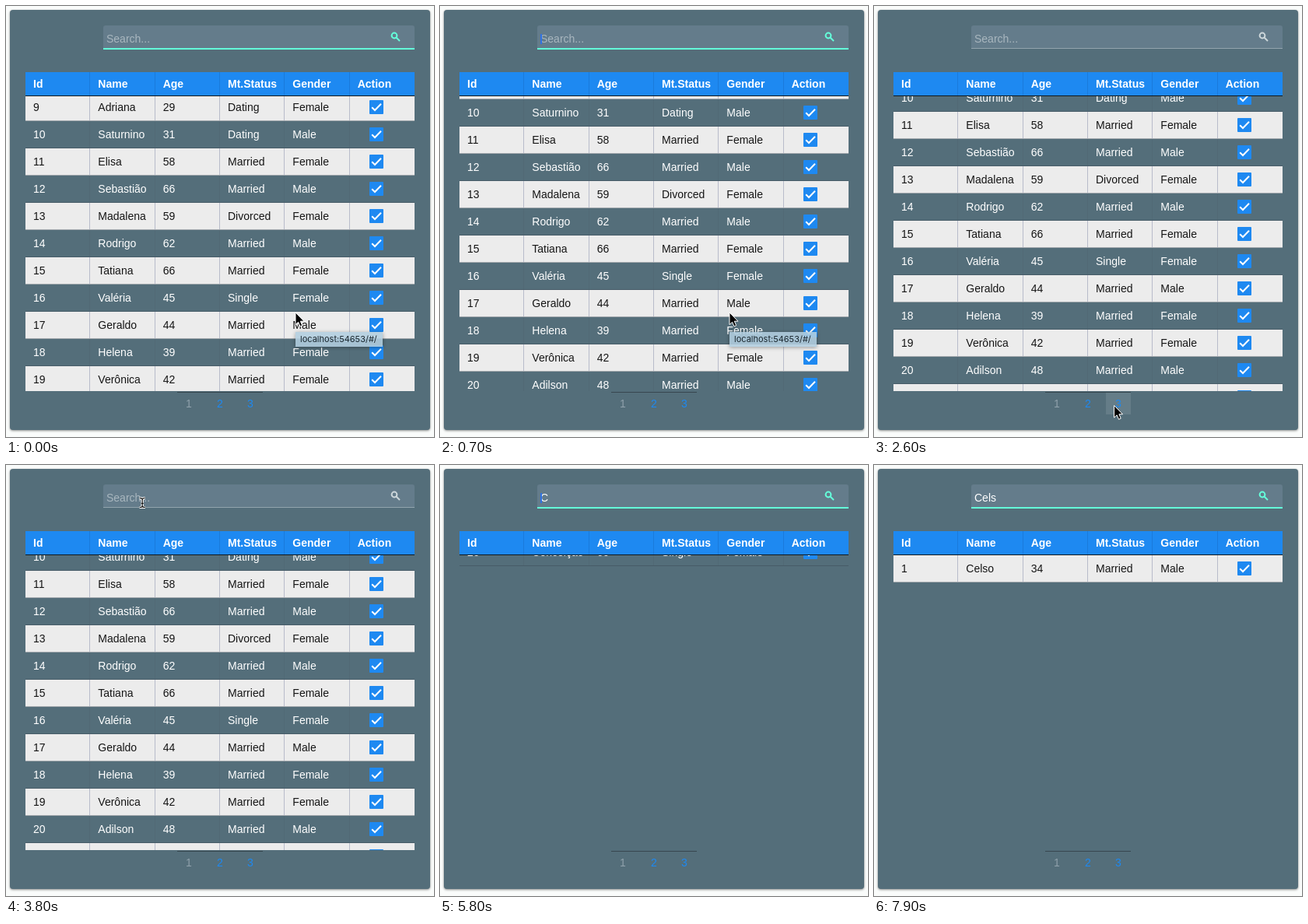
An HTML page that plays this animation: 550x554 px, repeating every 8 s.

```html
<!DOCTYPE html>
<html lang="en">
<head>
<meta charset="utf-8">
<title>Searchable table</title>
<style>
  html, body { margin: 0; width: 100%; height: 100%; overflow: hidden; background: #fafcfb; }
  body { position: relative; font: 14px "Liberation Sans", Arial, sans-serif; color: #fff; }
  div, svg { position: absolute; box-sizing: border-box; }
  #card { left: 5px; top: 5px; width: 540px; height: 540px; border-radius: 4px;
    background: #546e7a; box-shadow: 0 1px 3px rgba(0,0,0,.45); }
  #field { left: 125px; top: 25px; width: 400px; height: 30px; border-radius: 3px 3px 0 0;
    background: #647c8b; border-bottom: 1px solid #93a4ad; line-height: 34px; padding-left: 4px; }
  #line { left: 0; top: 29px; width: 400px; height: 2px; background: #64ffda; opacity: var(--focus); }
  #hint { left: 4px; top: 0; color: #a9b7bf; }
  #caret { width: 2px; height: 13px; top: 11px; background: #2f72e4; }
  #icon { left: 494px; top: 33px; fill: none; stroke-width: 2;
    stroke: color-mix(in srgb, #64ffda calc(var(--focus) * 100%), #ccd6da); }
  .row { left: 0; width: 500px; height: 35px; line-height: 34px; border-bottom: 1px solid rgba(50,65,78,.4); }
  .row.light { background: #ececec; color: #161616; }
  .cell { top: 0; width: 83.33px; height: 100%; padding-left: 10px; white-space: nowrap;
    border-right: 1px solid rgba(90,100,140,.35); }
  .cell:last-child { border: 0; }
  .row:not(.light):not(.head) .cell { border-color: rgba(70,90,105,.25); }
  .head { left: 25px; top: 85px; height: 31px; line-height: 30px; background: #1e89f1;
    border-bottom: 1px solid #10181e; font-weight: bold; }
  .head .cell { border-color: rgba(20,90,170,.3); }
  #view { left: 25px; top: 116px; width: 500px; height: 379px; overflow: hidden; }
  .box { left: 25px; top: 8px; }
  #pages { left: 220px; top: 496px; width: 110px; height: 30px; border-top: 1px solid #37474f;
    line-height: 29px; color: #1e89f1; }
  #pages div { width: 32px; height: 28px; text-align: center; }
  #three { left: 78px; }
  #tip { left: 372px; top: 419px; width: 112px; height: 19px; line-height: 19px; padding-left: 6px;
    background: rgba(178,207,224,.88); color: #1b2830; box-shadow: 0 1px 5px rgba(0,0,0,.35);
    font: 11px/19px Inter, sans-serif; white-space: nowrap; }
  #arrow, #beam { left: 0; top: 0; overflow: visible; }
</style>
</head>
<body>
<div id="card"></div>
<div id="field"><div id="hint">Search...</div><span id="typed"></span><div id="caret"></div><div id="line"></div></div>
<svg id="icon" width="14" height="14"><circle cx="5" cy="5" r="3.4"/><path d="M7.5 7.5L12 12"/></svg>
<div id="view"></div>
<div id="pages">
  <div style="left:-1px;color:#8fa1ab">1</div><div style="left:39px">2</div><div id="three">3</div>
</div>
<div id="tip">localhost:54653/#/</div>
<svg id="arrow" width="14" height="20"><path d="M0 0V15.5L3.6 12.3L6 17.8L8.7 16.6L6.3 11.2H11Z" fill="#000" stroke="#fff"/></svg>
<svg id="beam" width="10" height="14" fill="none">
  <path id="stem" d="M-3.5-6Q0-6 0-4Q0-6 3.5-6M0-4V4M-3.5 6Q0 6 0 4Q0 6 3.5 6M-1.5 1H1.5" stroke="#fff" stroke-width="3"/>
  <use href="#stem" style="stroke:#000"/>
  <path d="M-3.5-6Q0-6 0-4Q0-6 3.5-6M0-4V4M-3.5 6Q0 6 0 4Q0 6 3.5 6M-1.5 1H1.5" stroke="#111" stroke-width="1.2"/>
</svg>
<script>
const LOOP = 8000, ROW = 35;
const $ = id => document.getElementById(id);
const people = `1 Celso 34 Married Male
3 Ricardo 18 Single Male
8 Bianca 28 Married Female
9 Adriana 29 Dating Female
10 Saturnino 31 Dating Male
11 Elisa 58 Married Female
12 Sebastião 66 Married Male
13 Madalena 59 Divorced Female
14 Rodrigo 62 Married Male
15 Tatiana 66 Married Female
16 Valéria 45 Single Female
17 Geraldo 44 Married Male
18 Helena 39 Married Female
19 Verônica 42 Married Female
20 Adilson 48 Married Male
21 Bianca 32 Married Female
26 Conceição 60 Single Female`.split("\n").map(s => s.split(" "));

const checkbox = on => `<svg class="box" width="18" height="18" fill="none" stroke-width="2">` + (on
  ? `<rect width="18" height="18" rx="1" fill="#1e89f1"/><path d="M3.2 9.3L7 13L15 4.8" stroke="#fff"/>`
  : `<rect x="1" y="1" width="16" height="16" rx="1" stroke="#c3ced3"/>`) + `</svg>`;

function addRow(parent, cells, cls) {
  const row = document.createElement("div");
  row.className = "row " + cls;
  row.innerHTML = cells.map((c, i) => `<div class="cell" style="left:${i * 250 / 3}px">${c}</div>`).join("");
  parent.append(row);
  return row;
}
addRow(document.body, ["Id", "Name", "Age", "Mt.Status", "Gender", "Action"], "head");
const rows = people.map(p => ({
  id: +p[0], name: p[1].toLowerCase(),
  el: addRow($("view"), [...p, checkbox(p[0] !== "3")], "")
}));

const ramp = (t, a, b) => Math.min(1, Math.max(0, (t - a) / (b - a)));

// Values between keys [time, ...values], linear
function along(keys, t) {
  let i = 1;
  while (i < keys.length - 1 && t > keys[i][0]) i++;
  const a = keys[i - 1], b = keys[i], p = ramp(t, a[0], b[0]);
  return a.slice(1).map((v, k) => v + (b[k + 1] - v) * p);
}

const scrolling = [[0, 283], [300, 286], [500, 293], [700, 311], [850, 324], [1000, 330]];
const pointer = [[950, 372, 394], [1120, 335, 455], [1300, 285, 508], [1900, 285, 508], [2300, 308, 514],
  [2600, 308, 514], [2800, 420, 420], [2950, 461, 300], [3150, 400, 160], [3400, 260, 59],
  [3600, 164, 49], [3750, 164, 49], [4100, 241, 45]];
const blinks = [[500, 1000], [1500, 1800], [3900, 4400], [4900, 5400], [5600, 6900], [7500, 7900]];
const keyTimes = [5600, 5900, 6100, 7500];

function draw(t) {
  const focus = 1 - ramp(t, 1800, 2200) + ramp(t, 3800, 4100);
  document.body.style.setProperty("--focus", focus);

  const typed = "Cels".slice(0, keyTimes.filter(k => t >= k).length);
  $("typed").textContent = typed;
  $("hint").hidden = typed !== "";
  $("caret").hidden = !blinks.some(([a, b]) => t >= a && t < b);

  const filtered = t >= 5700;
  const scroll = filtered ? 330 * (1 - ramp(t, 5700, 6332)) ** 3 : along(scrolling, t)[0];
  let shown = 0;
  for (const { id, name, el } of rows) {
    el.hidden = filtered && !name.includes("c");
    if (el.hidden) continue;
    const i = filtered ? shown++ : id - 1;
    el.style.top = Math.round(i * ROW - scroll) + "px";
    el.classList.toggle("light", i % 2 === 0);
    el.style.opacity = name.includes("cel") ? 1 : 1 - ramp(t, 6800, 7200);
  }

  $("tip").style.opacity = 1 - ramp(t, 1200, 1650);
  const hover = ramp(t, 2000, 2300) - ramp(t, 2650, 2850);
  $("three").style.background = `rgba(255,255,255,${hover * .1})`;

  const [x, y] = along(pointer, t), inField = y < 55;
  $("arrow").style.display = inField ? "none" : "";
  $("beam").style.display = inField && t < 5100 ? "" : "none";
  $("arrow").style.transform = $("beam").style.transform = `translate(${x}px,${y}px)`;
}

const start = performance.now();
(function tick() {
  draw((performance.now() - start) % LOOP);
  requestAnimationFrame(tick);
})();
</script>
</body>
</html>
```
